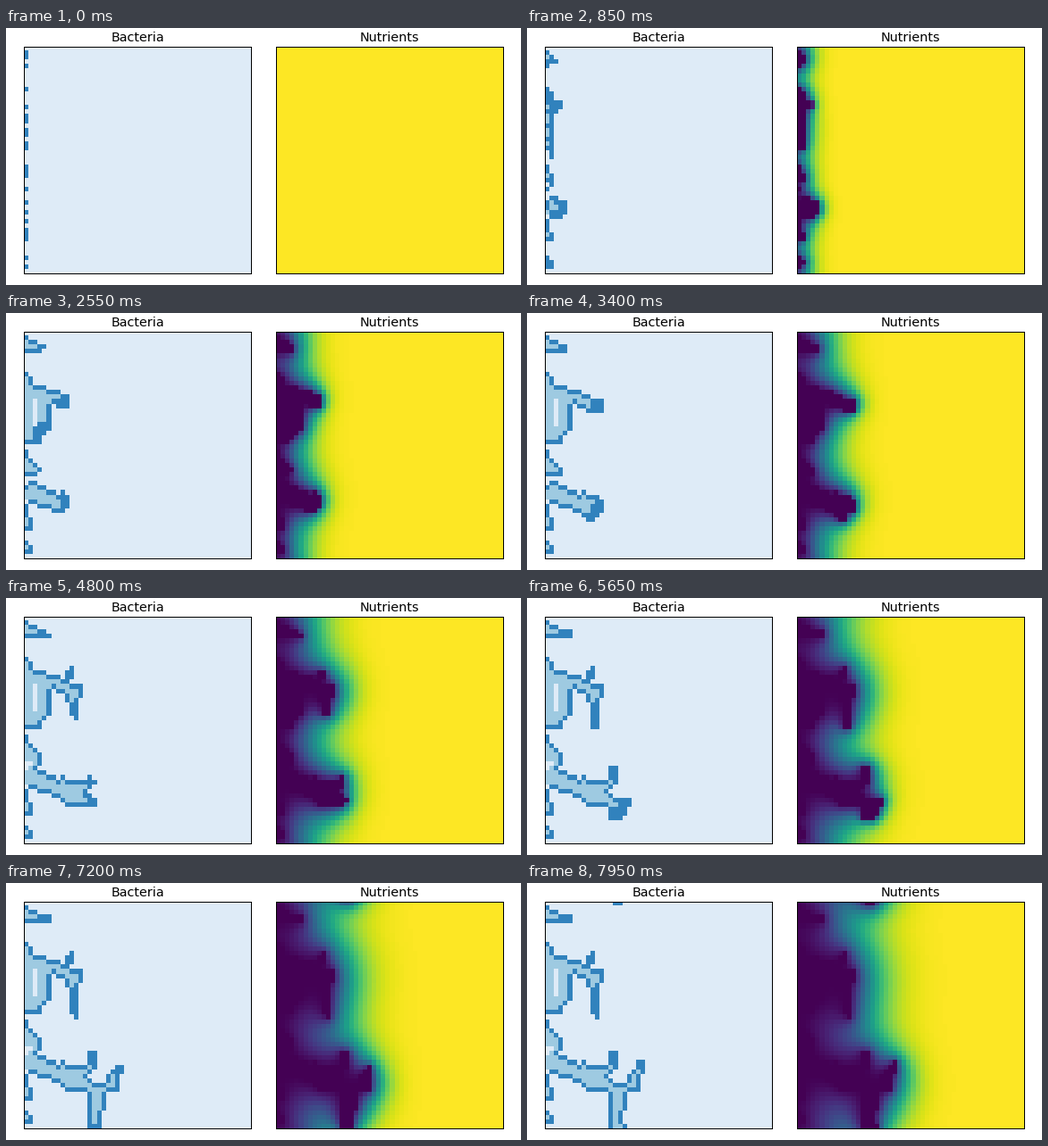
A matplotlib script that plays this animation: 576x288 px, repeating every 8000 ms.

```python
import numpy as np
import matplotlib.pyplot as plt
from matplotlib.animation import FuncAnimation
from matplotlib.colors import ListedColormap

N, FRAMES, INTERVAL = 50, 160, 50
W, H = 576, 288
DIFFUSION = 0.145
UPTAKE = 0.25
YOUTH = 13        # frames a new cell stays active even when enclosed

SEEDS = [1, 2, 4, 9, 13, 15, 16, 18, 19, 21, 22, 26, 27, 28,
         31, 34, 36, 38, 40, 41, 42, 46, 48]

# Growing branches: radius, then key points (frame, column, row)
BRANCHES = [
    (1.3, (2, 0, 2.5), (25, 2, 3), (110, 4.5, 3.7)),
    (1.4, (4, 0, 11), (12, 0.3, 23)),
    (1.6, (8, 1, 12.5), (34, 6, 14.3), (62, 11.5, 16)),
    (1.5, (24, 4, 14), (34, 4, 20), (44, 2, 23)),
    (1.2, (62, 10, 17), (90, 11, 21), (112, 10.5, 24)),
    (0.9, (80, 9, 13.5), (95, 10, 11.5)),
    (1.2, (8, 0, 28), (20, 1.5, 30), (75, 2.5, 31)),
    (2.4, (1, 1, 34.8), (32, 5.5, 37), (60, 10.5, 37.5)),
    (0.8, (8, 0, 39), (16, 0.4, 43)),
    (1.4, (58, 9, 40), (90, 14, 40.3), (118, 19.5, 40.3)),
    (1.2, (74, 12, 37.5), (90, 14, 35.5), (105, 14.5, 33.5)),
    (1.1, (112, 18, 39.5), (128, 19.5, 37.5), (158, 21, 35.5)),
    (1.8, (104, 15.5, 42.5), (126, 15, 47), (148, 15.5, 49)),
    (0.9, (8, 0, 46.7), (12, 0.5, 47.5)),
]


def birth_times():
    """Frame at which each cell appears: branch tips leave ragged trails."""
    rng = np.random.default_rng(4)
    rows, cols = np.mgrid[:N + 1, :N]
    ragged = rng.uniform(0.8, 1.1, rows.shape)
    late = rng.uniform(0, 5, rows.shape)
    birth = np.full(rows.shape, np.inf)
    for radius, *points in BRANCHES:
        times, xs, ys = zip(*points)
        for t in np.linspace(times[0], times[-1], 60):
            x, y = np.interp(t, times, xs), np.interp(t, times, ys)
            dist = np.hypot(cols - x, rows - y)
            when = np.where(dist < radius * ragged, t + 2 * dist + late, np.inf)
            birth = np.minimum(birth, when)
    birth[0] = np.minimum(birth[0], birth[N])
    birth[SEEDS, 0] = 0
    return birth[:N]


def neighbours(a):
    """Four shifted copies; rows wrap round, columns stop at the walls."""
    left = np.hstack([a[:, :1], a[:, :-1]])
    right = np.hstack([a[:, 1:], a[:, -1:]])
    return np.roll(a, 1, 0), np.roll(a, -1, 0), left, right


def beside(mask):
    up, down, left, right = neighbours(mask)
    return up | down | left | right


def open_space(alive):
    space = np.zeros_like(alive)
    space[:, N // 2:] = True
    while True:
        grown = (space | beside(space)) & ~alive
        if (grown == space).all():
            return space
        space = grown


def simulate():
    birth = birth_times()
    food = np.ones((N, N))
    colony, nutrients = [], []
    for k in range(FRAMES):
        alive = birth <= k
        active = alive & (beside(open_space(alive)) | (k - birth < YOUTH))
        colony.append(alive.astype(int) + active)
        nutrients.append(food.copy())
        for _ in range(2):
            food = food + DIFFUSION * (sum(neighbours(food)) - 4 * food)
            food[alive] = np.maximum(food[alive] - UPTAKE, 0)
    return colony, nutrients


def panel(x, title, data, cmap, vmax):
    ax = fig.add_axes([x / W, 13 / H, 254.3 / W, 254.3 / H])
    ax.set_xticks([])
    ax.set_yticks([])
    ax.set_title(title, fontsize=14.4, pad=6)
    for spine in ax.spines.values():
        spine.set_linewidth(1)
    return ax.imshow(data, cmap=cmap, vmin=0, vmax=vmax,
                     interpolation="nearest", aspect="auto")


plt.rcParams["font.family"] = "DejaVu Sans"
colony, nutrients = simulate()
fig = plt.figure(figsize=(W / 72, H / 72), dpi=72, facecolor="white")
blues = ListedColormap(["#deebf7", "#9ecae1", "#3182bd"])
cells = panel(20.1, "Bacteria", colony[0], blues, 2)
field = panel(302.1, "Nutrients", nutrients[0], "viridis", 1)


def draw(k):
    cells.set_data(colony[k])
    field.set_data(nutrients[k])
    return cells, field


anim = FuncAnimation(fig, draw, frames=FRAMES, interval=INTERVAL,
                     repeat=True, repeat_delay=0)
plt.show()
```
